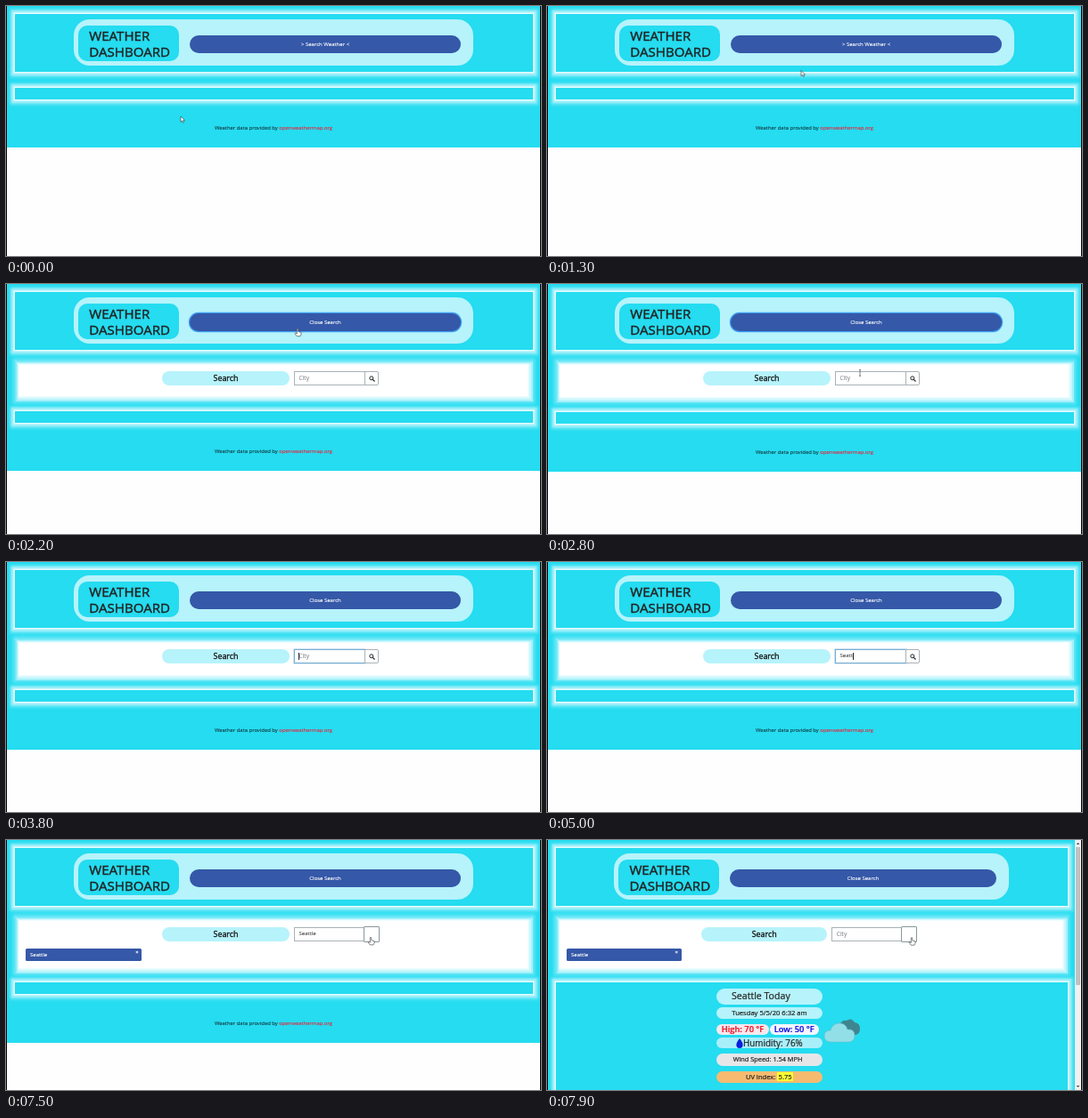
These frames come from a looping animation (600x281 px, 8000 ms). An HTML page:

```html
<!DOCTYPE html>
<html lang="en">
<head>
<meta charset="utf-8">
<title>Weather Dashboard</title>
<style>
  * { box-sizing: border-box; }
  html, body { margin: 0; width: 100%; height: 100%; overflow: hidden; }
  body { position: relative; background: #fefeff; font: 6px "Open Sans", "Noto Sans", sans-serif; color: #222;
    -webkit-text-stroke: .12px; }
  div, svg, .edge { position: absolute; white-space: pre; }
  .edge { top: 0; width: 1px; height: 281px; background: #000; }
  #page { left: 1px; top: 0; background: #25dcf0; overflow: hidden; }
  .panel { left: 8.5px; right: 8.5px; background: #25dcf0;
    box-shadow: 0 0 0 1.5px #e6fcff, 0 0 2px 4px #a6f1fa, 0 0 3px 6.5px #62e6f5; }
  #header { top: 9px; height: 65px; }
  #finder { left: 14px; right: 14px; top: 91px; background: #fff;
    box-shadow: 0 0 0 1.5px #eefdff, 0 0 1px 3.5px #ccf7fc, 0 0 1px 5.5px #a2f0fa, 0 0 3px 8.5px #62e6f5; }
  #banner { left: 12.5%; width: 75%; top: 15px; height: 52px; border-radius: 18px; background: #b6f3fb; }
  #title { left: 5.5px; top: 6.5px; width: 113px; height: 40px; padding: 2.5px 0 0 12px;
    border-radius: 10px; background: #25dcf0; font-size: 15.1px; line-height: 18px; -webkit-text-stroke: .4px; }
  #toggle { left: 130px; right: 14px; top: 18px; height: 19.5px; border-radius: 10px;
    background: #3558a8; color: #fff; line-height: 20px; text-align: center; }
  #toggle.focus { box-shadow: 0 0 0 1.2px #3d9cf0; }
  #label { left: 29.18%; width: 23.75%; top: 98px; height: 15.5px; border-radius: 8px; background: #b6f3fb;
    font-size: 8.9px; line-height: 16px; text-align: center; color: #111; -webkit-text-stroke: .3px; }
  #city { left: 53.85%; width: 13.3%; top: 98px; height: 15.5px; padding-left: 4.5px;
    border: 1px solid #a9b2b6; background: #fff; line-height: 13.5px; color: #555; }
  #city.empty { color: #8b8f94; font-size: 6.6px; }
  #city.focus { border-color: #78aed2; box-shadow: 0 0 0 .7px #b9d8ec; }
  #caret { top: 3px; width: .8px; height: 8px; background: #222; }
  #go { left: 67.1%; width: 16px; top: 98px; height: 15.5px; border: 1px solid #a9b2b6;
    border-radius: 0 2px 2px 0; background: #fff; }
  #go.focus { border: 1.8px solid #88979d; margin: -1px; width: 18px; height: 17.5px; border-radius: 1px; }
  #go svg { left: 4px; top: 3.5px; }
  #tag { left: 21px; width: 21.75%; top: 121.5px; height: 14.5px; padding-left: 5px; border-radius: 1.5px;
    background: #3558a8; color: #fff; line-height: 15px; }
  #tag div { right: 3.5px; top: -3px; font-size: 6px; font-weight: 700; }
  #footer { width: 100%; text-align: center; font-size: 5.9px; line-height: 10px; color: #15414a; }
  #footer span { color: #e5283f; }
  #results { left: 0; top: 0; }
  #results div { border-radius: 9px; text-align: center; color: #222; -webkit-text-stroke: .22px; }
  #results mark { background: #ff3; color: #222; padding: 0 1.5px; }
  #scrollbar { left: 592px; top: 0; width: 7px; height: 281px; background: #f1f1f1; }
  #scrollbar div { left: 1px; top: 8px; width: 5px; height: 155px; background: #c1c1c1; }
  #scrollbar svg { left: 1px; top: 2px; }
  #pointer { overflow: visible; left: 0; top: 0; }
</style>
</head>
<body>
<div id="page">
  <div id="header" class="panel"></div>
  <div id="banner">
    <div id="title">WEATHER
DASHBOARD</div>
    <div id="toggle"></div>
  </div>
  <div id="finder" class="panel"></div>
  <div id="weather" class="panel"></div>
  <div id="results">
    <svg style="left:309px;top:200px" width="42" height="28">
      <path fill="#3f858f" d="M21 14Q16 9 20 5Q22 2 26 3Q31-1 35 5Q41 6 41 12Q41 19 35 19H24Z"/>
      <path fill="#93dfe8" stroke="#6fbac4" stroke-width=".6"
        d="M7 27Q1 26 1 20Q1 14 8 14Q10 6 18 6Q25 6 27 13Q35 12 35 20Q35 26 29 27Z"/>
    </svg>
  </div>
  <div id="footer">Weather data provided by <span>openweathermap.org</span></div>
  <div id="label">Search</div>
  <div id="city"><span id="cityText"></span><div id="caret"></div></div>
  <div id="go"><svg id="lens" width="7" height="7" fill="none" stroke="#222">
    <circle cx="2.8" cy="2.8" r="2" stroke-width="1"/><path d="M4.3 4.3L6.5 6.5" stroke-width="1.2"/></svg></div>
  <div id="tag">Seattle<div>×</div></div>
</div>
<div id="scrollbar"><svg width="5" height="279" fill="#444"><path d="M.8 3L2.5 1L4.2 3Z"/><path d="M.8 274L2.5 276L4.2 274Z"/></svg><div></div></div>
<i class="edge" style="left:0"></i><i class="edge" style="left:599px"></i>
<svg id="pointer" width="10" height="12" fill="#fff" stroke="#333" stroke-width=".6">
  <path id="arrow" d="M0 0V6.2L1.5 5L2.5 7.2L3.5 6.7L2.6 4.6H4.4Z"/>
  <path id="hand" d="M-.7 0Q0-1 .7 0V3L4 3.8V6.2L3 8.2H-.8L-3 5.2L-2.4 4.4L-.7 5.5Z"/>
  <path id="beam" fill="none" d="M-1-3.5H1M0-3.5V3.5M-1 3.5H1"/>
</svg>
<script>
const $ = id => document.getElementById(id);
const show = (id, on) => $(id).style.display = on ? '' : 'none';
const setFocus = (id, on) => $(id).classList.toggle('focus', on);

const PALE = '#b6f3fb';
// left, top, width, height, font size, background, text, extra style
const cards = [
  [189, 167, 119, 17.5, 10.6, PALE, 'Seattle Today', 'text-align:left;padding-left:17px'],
  [189, 187.5, 119, 13, 7.6, PALE, 'Tuesday 5/5/20 6:32 am', ''],
  [189, 207, 59, 11.5, 9.3, '#f6e9ee', 'High: 70 °F', 'color:#f01020;font-weight:600'],
  [249, 207, 54.5, 11.5, 9.3, '#f4f6ff', 'Low: 50 °F', 'color:#1010e0;font-weight:600'],
  [189, 222, 119, 12, 9.9, '#a9effa',
    '<svg style="left:22px;top:1px" width="8" height="11"><path fill="#0a1fe0" d="M4 0Q8 5 7.6 7.5A3.6 3.4 0 0 1 .4 7.5Q0 5 4 0Z"/></svg>Humidity: 76%',
    'text-align:left;padding-left:30px'],
  [189, 240, 119, 13.5, 7.35, '#e6e6e9', 'Wind Speed: 1.54 MPH', 'padding-right:4px'],
  [189, 260, 119, 13, 7.5, '#f7bb70', 'UV Index: <mark>5.75</mark>', ''],
];
$('results').insertAdjacentHTML('beforeend', cards.map(([x, y, w, h, size, fill, text, extra]) =>
  `<div style="left:${x}px;top:${y}px;width:${w}px;height:${h}px;font-size:${size}px;line-height:${h}px;background:${fill};${extra}">${text}</div>`
).join(''));

const OPEN = 1900, FIELD_CLICK = 3600, SUBMIT = 7500, LOADED = 7700;
const keyTimes = [4400, 4500, 4700, 4900, 5000, 5700, 6000];
const path = [
  [0, 196, 124], [300, 196, 124], [900, 228, 108], [1500, 305, 60], [1800, 322, 43], [1900, 323, 43.5],
  [2200, 327, 50.5], [2700, 350, 98], [3000, 354, 105], [6400, 354, 105], [6800, 382, 110], [7200, 409, 109.5], [8000, 409, 110],
];

function pointerAt(t) {
  const i = path.findIndex(point => point[0] > t);
  const [t0, x0, y0] = path[i - 1], [t1, x1, y1] = path[i];
  const p = (t - t0) / (t1 - t0), e = p * p * (3 - 2 * p);
  return [x0 + (x1 - x0) * e, y0 + (y1 - y0) * e];
}

function finderHeight(t) {
  if (t < OPEN) return 0;
  if (t >= SUBMIT) return 52.5;
  if (t < 2000) return 15;
  return t < 2100 ? 33 : t < 2800 ? 35.3 : 36;
}

function draw(t) {
  const open = t >= OPEN, submitted = t >= SUBMIT, loaded = t >= LOADED;
  const height = finderHeight(t), shift = open ? height + 16 : 0;

  $('page').style.width = (loaded ? 591 : 598) + 'px';
  $('page').style.height = (loaded ? 281 : 159 + shift) + 'px';
  $('finder').style.height = height + 'px';
  $('weather').style.top = 91.5 + shift + 'px';
  $('weather').style.height = loaded ? '200px' : '13px';
  $('footer').style.top = 132 + shift + 'px';
  $('toggle').textContent = open ? 'Close Search' : '> Search Weather <';
  setFocus('toggle', t >= 1800 && t < FIELD_CLICK);
  for (const id of ['finder', 'label', 'city', 'go']) show(id, open);
  show('tag', submitted);
  show('results', loaded);
  show('footer', !loaded);
  show('scrollbar', loaded);

  const typed = loaded ? '' : 'Seattle'.slice(0, keyTimes.filter(k => k <= t).length);
  const typing = t >= FIELD_CLICK && t < 7200;
  const lastInput = Math.max(FIELD_CLICK, ...keyTimes.filter(k => k <= t));
  $('cityText').textContent = typed || 'City';
  $('city').classList.toggle('empty', !typed);
  setFocus('city', typing);
  show('caret', typing && (t - lastInput) % 1000 < 500);
  $('caret').style.left = (typed ? 4.8 + $('cityText').offsetWidth : 4.3) + 'px';
  setFocus('go', t >= 7200);
  show('lens', t >= 2000 && t < 7200);

  const [x, y] = pointerAt(t);
  const onToggle = x > 206 && y > 33 && y < 52.5;
  const onField = open && x > 323 && x < 402 && y > 98 && y < 114;
  const onGo = open && x >= 402 && y > 98;
  show('pointer', t < FIELD_CLICK || t >= 6500);
  show('hand', onToggle || onGo);
  show('beam', onField);
  show('arrow', !onToggle && !onField && !onGo);
  $('pointer').style.transform = `translate(${x}px, ${y}px)`;
}

// The picture advances ten times a second.
function tick() {
  draw(Math.floor(performance.now() % 8000 / 100) * 100);
  requestAnimationFrame(tick);
}
tick();
</script>
</body>
</html>
```
